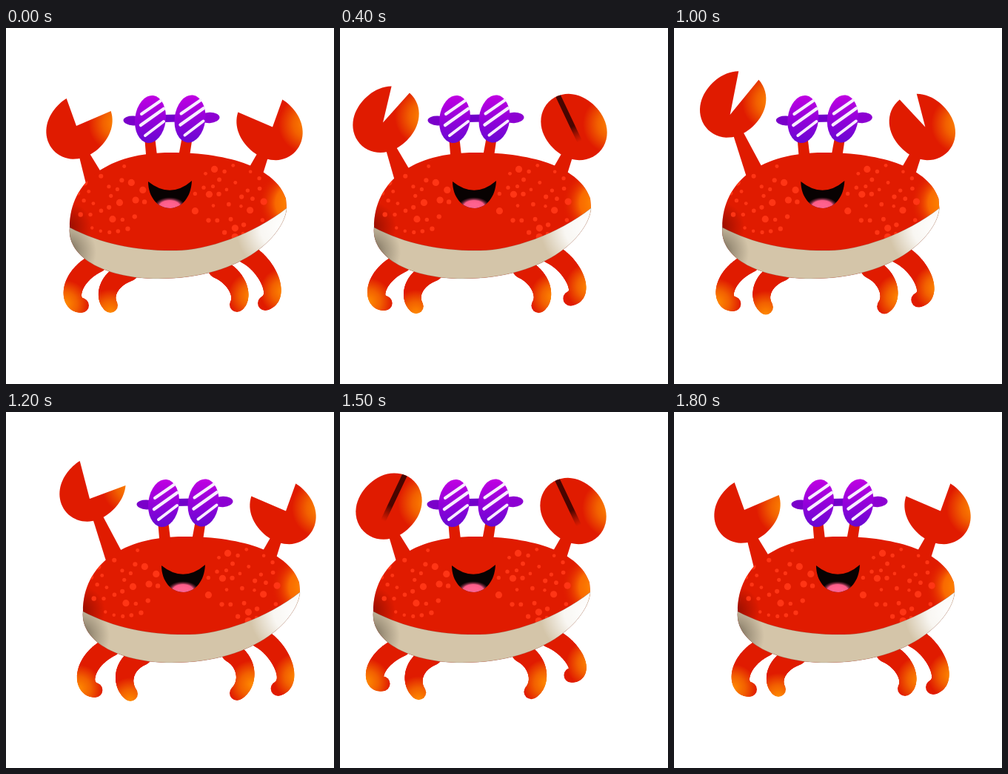
Recreate the animation shown at these times as an HTML page with a canvas. Size 443 px wide and 480 px high, loop 1900 ms.

```html
<!DOCTYPE html>
<html lang="en">
<head>
<meta charset="utf-8">
<title>Dancing crab</title>
<style>
  html, body { margin: 0; width: 100%; height: 100%; overflow: hidden; background: #fff; }
  canvas { display: block; width: 443px; height: 480px; }
</style>
</head>
<body>
<canvas id="stage"></canvas>
<script>
const canvas = document.getElementById('stage');
const ctx = canvas.getContext('2d');
const ratio = window.devicePixelRatio || 1;
canvas.width = 443 * ratio;
canvas.height = 480 * ratio;

const STEP = 100, LOOP = 1900;
const RED = '#e01b00', ORANGE = '#ff8a00';

// Key values, three steps apart.
const DANCE = {
  sway: [0, -40, -40, -40, 18, -41, 0],
  leftOpen: [1, 0, 1, 0, 1, 0, 1],
  rightOpen: [1, 0, 0, 0, 1, 0, 1],
  lift: [0, 0, .9, 1, 1, .17, 0],
  reach: [0, 3, 3, 2, 0, 8, 0],
  kick: [0, 0, 1, .4, -.1, .85, 0],
  tuck: [0, 0, .6, .1, 1, .7, 0]
};

// Hip, two handles and foot; the foot moves by `move` times its track.
const LEGS = [
  { pts: [124, 316, 85, 335, 82, 372, 102, 374], move: [-4, -9], track: 'kick', glow: [-22, -2] },
  { pts: [166, 328, 138, 338, 131, 362, 141, 374], move: [9, 6], track: 'tuck', glow: [0, 10] },
  { pts: [286, 324, 312, 335, 322, 362, 312, 373], move: [-18, 6], track: 'tuck', glow: [20, -12] },
  { pts: [324, 304, 352, 318, 373, 362, 350, 371], move: [4, -19], track: 'kick', glow: [25, -16] }
];
const FLEX = [0, .2, .6, 1];

const under = 'C377 275 325 338 205 338C140 338 82 312 86 269Z';
const body = new Path2D('M86 269C86 205 140 168 222 168C305 168 365 190 378 230L379 243' + under);
const belly = new Path2D('M86 269C130 292 180 301 230 300C270 300 335 278 379 243' + under);
const mouth = new Path2D('M192 207Q222 231 251 206C250 228 238 242 222 243C205 243 192 228 192 207Z');

const lerp = (a, b, f) => a + (b - a) * f;

function scatter(cx, cy, rx, ry, count, seed) {
  const rand = () => (seed = seed * 16807 % 2147483647) / 2147483647;
  const dots = [];
  for (let tries = 0; dots.length < count && tries < 3000; tries++) {
    const t = rand() * Math.PI * 2, d = Math.sqrt(rand());
    const x = cx + rx * d * Math.cos(t), y = cy + ry * d * Math.sin(t);
    if (dots.every(o => Math.hypot(o.x - x, o.y - y) > 11.5))
      dots.push({ x, y, r: dots.length % 5 ? 2.2 + rand() : 4.6 });
  }
  return dots;
}
const dots = [...scatter(143, 232, 48, 50, 30, 11), ...scatter(303, 234, 50, 52, 33, 29)];

function radial(x, y, r, ...stops) {
  const g = ctx.createRadialGradient(x, y, 0, x, y, r);
  stops.forEach((c, i) => g.addColorStop(i / (stops.length - 1), c));
  return g;
}

function linear(x1, y1, x2, y2, ...stops) {
  const g = ctx.createLinearGradient(x1, y1, x2, y2);
  stops.forEach((c, i) => g.addColorStop(i / (stops.length - 1), c));
  return g;
}

function ellipse(x, y, rx, ry, fill, tilt = 0) {
  ctx.beginPath();
  ctx.ellipse(x, y, rx, ry, tilt, 0, Math.PI * 2);
  ctx.fillStyle = fill;
  ctx.fill();
}

function line(x1, y1, x2, y2, width, color) {
  ctx.beginPath();
  ctx.moveTo(x1, y1);
  ctx.lineTo(x2, y2);
  ctx.lineWidth = width;
  ctx.strokeStyle = color;
  ctx.stroke();
}

// Tapered limb between two centres.
function arm(x1, y1, w1, x2, y2, w2) {
  ctx.beginPath();
  ctx.moveTo(x1 - w1, y1);
  ctx.lineTo(x1 + w1, y1);
  ctx.lineTo(x2 + w2, y2);
  ctx.lineTo(x2 - w2, y2);
  ctx.fillStyle = RED;
  ctx.fill();
}

// Row of shrinking discs along a cubic curve.
function drawLeg({ pts, move, glow }, amount) {
  const p = pts.map((v, i) => v + move[i % 2] * amount * FLEX[i >> 1]);
  const fill = radial(p[6] + glow[0], p[7] + glow[1], 32, ORANGE, '#f26000', RED);
  for (let i = 0; i <= 40; i++) {
    const t = i / 40, s = 1 - t;
    const at = k => s * s * s * p[k] + 3 * s * s * t * p[k + 2] + 3 * s * t * t * p[k + 4] + t * t * t * p[k + 6];
    const r = 13.5 - 3.5 * t * t;
    ellipse(at(0), at(1), r, r, fill);
  }
}

// Tilted egg with a wedge cut out; side -1 mirrors it.
function drawClaw(x, y, open, lift, side) {
  const at = deg => {
    const t = deg * Math.PI / 180;
    const r = 44 + 4 * Math.cos(2 * t - Math.PI / 2);
    return [r * Math.sin(t), -r * Math.cos(t)];
  };
  const outer = 27 - 52 * open, inner = 27 + (38 + 20 * lift) * open;
  const shut = open < .05;

  ctx.save();
  ctx.translate(x, y);
  ctx.scale(side, 1);
  ctx.beginPath();
  if (!shut) ctx.moveTo(-4, 14 * lift);
  for (let i = 0; i <= 60; i++) ctx.lineTo(...at(lerp(outer, inner - 360, i / 60)));
  ctx.closePath();
  ctx.fillStyle = radial(52 * side, -4, 40, ORANGE, '#f26000', RED);
  ctx.fill();
  if (shut) {
    const [tx, ty] = at(27);
    ctx.clip();
    line(tx, ty, -7, 18, 7, linear(tx, ty, -7, 20, '#480500', '#480500', '#480500', 'rgba(110,10,0,0)'));
  }
  ctx.restore();
}

function drawBody() {
  ctx.fillStyle = RED;
  ctx.fill(body);
  ctx.save();
  ctx.clip(body);
  ctx.fillStyle = radial(388, 236, 48, '#ff9000', 'rgba(255,125,0,.8)', 'rgba(224,27,0,0)');
  ctx.fillRect(320, 180, 70, 110);
  ctx.fillStyle = radial(82, 268, 34, 'rgba(70,0,0,.5)', 'rgba(70,0,0,0)');
  ctx.fillRect(80, 220, 50, 70);
  dots.forEach(d => ellipse(d.x, d.y, d.r, d.r, '#ff3515'));
  ctx.restore();

  ctx.fillStyle = '#d4c5a9';
  ctx.fill(belly);
  ctx.save();
  ctx.clip(belly);
  ctx.fillStyle = radial(376, 268, 66, '#fff', 'rgba(255,255,255,.85)', 'rgba(255,255,255,0)');
  ctx.fillRect(280, 235, 110, 110);
  ctx.fillStyle = radial(80, 302, 42, 'rgba(50,42,30,.7)', 'rgba(50,42,30,.3)', 'rgba(50,42,30,0)');
  ctx.fillRect(80, 260, 70, 80);
  ctx.restore();
  ctx.lineWidth = .5;
  ctx.strokeStyle = 'rgba(90,80,70,.35)';
  ctx.stroke(belly);
}

function drawMouth() {
  ctx.fillStyle = '#080202';
  ctx.fill(mouth);
  ctx.save();
  ctx.clip(mouth);
  ctx.translate(221, 241);
  ctx.scale(1, .6);
  ellipse(0, 0, 21, 21, radial(0, 0, 21, '#ff628f', '#ff628f', '#fa5c88', 'rgba(90,25,45,.2)'));
  ctx.restore();
}

function drawLens(x, y) {
  ellipse(x, y, 20.8, 32.2, linear(x, y - 32, x, y + 32, '#c000e2', '#9400da', '#6808d2'), .12);
  const shine = '#f8edff';
  line(x - 12, y - 7, x + 14, y - 25, 4, shine);
  line(x - 13, y + 8, x + 18, y - 14, 4.5, shine);
  line(x - 7, y + 22, x + 18, y + 3, 4, shine);
}

function drawGlasses() {
  arm(194, 146, 7, 197, 176, 7.5);
  arm(245, 146, 7, 240, 176, 7.5);
  ellipse(172, 125, 13.5, 6.5, '#7a00ca', .05);
  ellipse(275, 121, 13.5, 7.2, '#8d00d2', -.05);
  line(212, 122, 234, 121.5, 10, '#7200ca');
  drawLens(195, 123);
  drawLens(248.5, 122.5);
}

function draw(time) {
  const pos = Math.floor(time % LOOP / STEP) / 3;
  const i = Math.min(5, Math.floor(pos));
  const now = name => lerp(DANCE[name][i], DANCE[name][i + 1], pos - i);
  const lift = now('lift'), reach = now('reach');

  ctx.setTransform(ratio, 0, 0, ratio, 0, 0);
  ctx.fillStyle = '#fff';
  ctx.fillRect(0, 0, 443, 480);
  ctx.translate(now('sway'), 0);
  ctx.lineCap = 'round';

  LEGS.forEach(leg => drawLeg(leg, now(leg.track)));

  const x = 99 + reach, y = 132 - 29 * lift;
  arm(x + 5, y + 34, 7, 123 + 12 * lift + 1.2 * reach, 210, 15);
  arm(348, 168, 8, 331, 206, 13);
  drawClaw(x, y, now('leftOpen'), lift, 1);
  drawClaw(356, 133.5, now('rightOpen'), 0, -1);

  drawBody();
  drawMouth();
  drawGlasses();
}

const start = performance.now();
function tick() {
  draw(performance.now() - start);
  requestAnimationFrame(tick);
}
tick();
</script>
</body>
</html>
```
